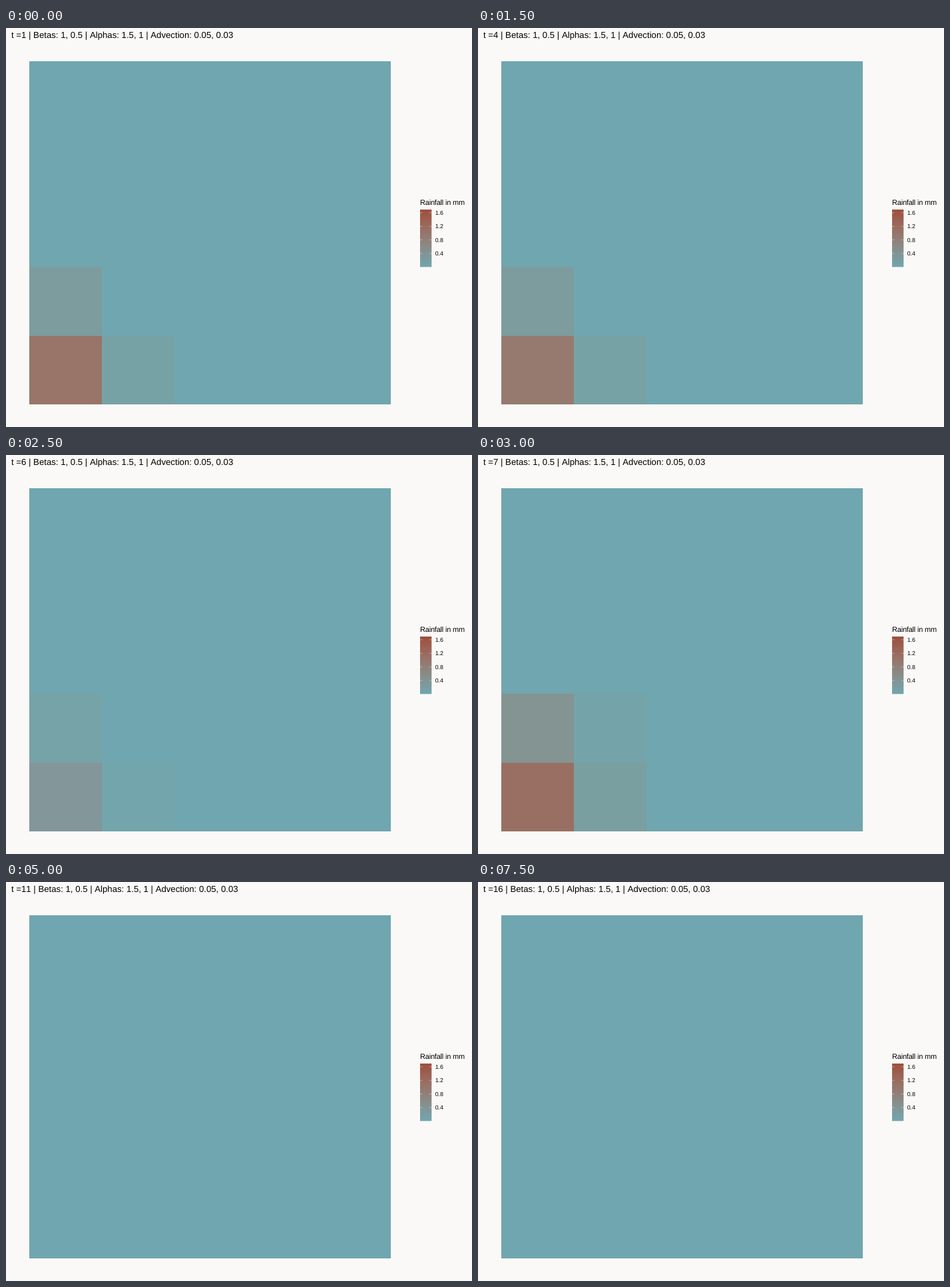
An HTML page for the animation above (8 s loop, 700x600 px).

```html
<!DOCTYPE html>
<html lang="en">
<head>
<meta charset="utf-8">
<title>Rainfall grid</title>
<style>
  html, body { margin: 0; width: 100%; height: 100%; overflow: hidden; background: #faf9f7; }
  svg { display: block; width: 700px; height: 600px; }
  text {
    font-family: "Liberation Sans", Arial, sans-serif;
    font-kerning: none;
    text-rendering: geometricPrecision;
    fill: #000;
  }
</style>
</head>
<body>
<svg viewBox="0 0 700 600">
  <defs>
    <linearGradient id="scale" x1="0" y1="0" x2="0" y2="1">
      <stop offset="0" stop-color="#9e4f3d"/>
      <stop offset=".35" stop-color="#997064"/>
      <stop offset=".7" stop-color="#878f8c"/>
      <stop offset="1" stop-color="#70a6af"/>
    </linearGradient>
  </defs>
  <rect width="700" height="600" fill="#faf9f7"/>
  <text id="title" x="8" y="15.3" font-size="13.2"></text>
  <rect x="35" y="50" width="543" height="516" fill="#70a6af"/>
  <g id="cells" shape-rendering="crispEdges"></g>
  <text x="622" y="266" font-size="11" letter-spacing="-0.2">Rainfall in mm</text>
  <rect x="622" y="273" width="17.3" height="86.4" fill="url(#scale)"/>
  <g id="ticks" font-size="8.8"></g>
</svg>
<script>
const STEP = 500, LOOP = 8000;
const DRY = "#70a6af";
const NS = "http://www.w3.org/2000/svg";
const byId = id => document.getElementById(id);

function add(parent, tag, attrs, text = "") {
  const el = document.createElementNS(NS, tag);
  for (const key in attrs) el.setAttribute(key, attrs[key]);
  el.textContent = text;
  return parent.appendChild(el);
}

// Colours per step: corner, above corner, right of corner, diagonal.
const rain = [
  ["#987568", "#7d9c9e", "#77a2a5", DRY],
  ["#7f9b9d", "#74a4aa", DRY, DRY],
  ["#7f9b9d", "#74a4aa", DRY, DRY],
  ["#967a6f", "#7d9c9e", "#77a2a5", DRY],
  ["#9d4f3d", "#878f8c", "#7e9c9e", "#75a4aa"],
  ["#83969a", "#76a3a8", "#73a5ac", DRY],
  ["#996f63", "#849492", "#7a9fa1", "#74a4a9"]
];
const dryStep = [DRY, DRY, DRY, DRY];

const cells = [[35, 463, 103], [35, 359, 104], [144, 463, 103], [144, 359, 104]]
  .map(([x, y, height]) => add(byId("cells"), "rect", { x, y, width: 109, height }));

["0.4", "0.8", "1.2", "1.6"].forEach((label, i) => {
  const y = 339.1 - i * 20.4;
  add(byId("ticks"), "path", {
    d: `M622 ${y}h3.5M635.8 ${y}h3.5`, stroke: "#fff", "stroke-width": 0.4
  });
  add(byId("ticks"), "text", { x: 644.7, y: y + 3 }, label);
});

let shown = -1;
function draw(time) {
  const step = Math.floor((time % LOOP) / STEP);
  if (step !== shown) {
    shown = step;
    byId("title").textContent =
      `t =${step + 1} | Betas: 1, 0.5 | Alphas: 1.5, 1 | Advection: 0.05, 0.03`;
    const colours = rain[step] || dryStep;
    cells.forEach((cell, i) => cell.setAttribute("fill", colours[i]));
  }
}

const start = performance.now();
function tick() {
  draw(performance.now() - start);
  requestAnimationFrame(tick);
}
tick();
</script>
</body>
</html>
```
